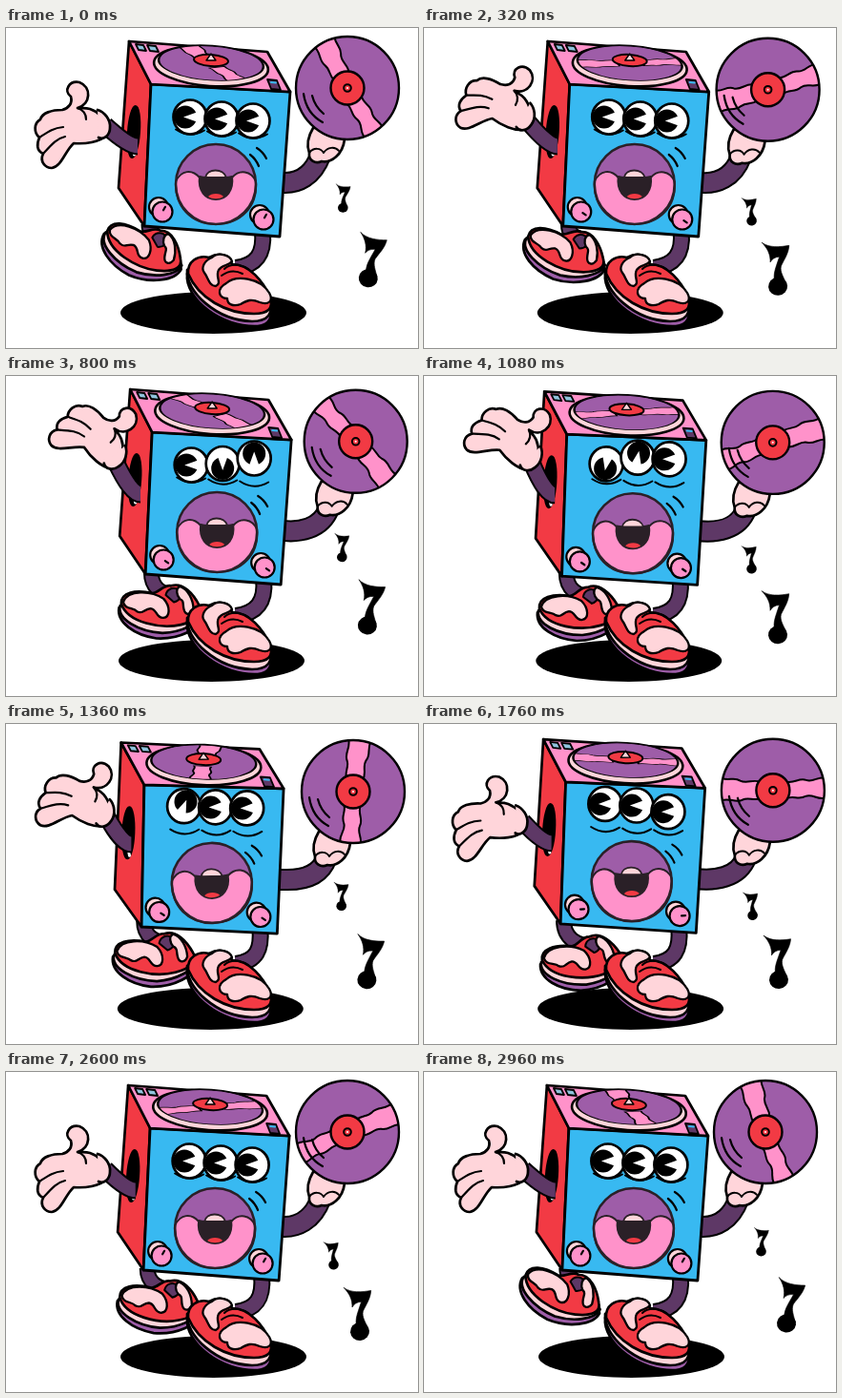
These frames come from a looping animation (432x336 px, 3 s). An HTML page with a canvas:

```html
<!DOCTYPE html>
<html lang="en">
<head>
<meta charset="utf-8">
<title>Dancing speaker</title>
<style>
html, body { margin: 0; width: 100%; height: 100%; overflow: hidden; background: #fff; }
canvas { display: block; width: 432px; height: 336px; }
</style>
</head>
<body>
<canvas id="stage" width="432" height="336"></canvas>
<script>
const ctx = document.getElementById('stage').getContext('2d');
const LOOP = 3000, SPIN = 1500, WIGGLE = 750, STEP = 40;
const RAD = Math.PI / 180, TAU = Math.PI * 2;
const INK = '#000', DARK = '#2a2027', BLUE = '#38b9f1', RED = '#f23a44', PINK = '#ff92ca',
      PURPLE = '#9e5da8', PLUM = '#5e3866', SKIN = '#ffd5da', WHITE = '#fff', STEEL = '#8fc3dc';

// Smooth step from 0 to 1 between two times
function ease(t, from, to) {
  const u = Math.min(1, Math.max(0, (t - from) / (to - from)));
  return u * u * (3 - 2 * u);
}
const pulse = (t, a, b, c, d) => ease(t, a, b) - ease(t, c, d);
const wave = (t, shift) => Math.cos(TAU * (t - shift) / WIGGLE);

function pose(t) {
  const lean = pulse(t, 900, 1300, 1420, 2000);
  const sway = 1.2 * Math.sin(TAU * t / LOOP);
  const greet = pulse(t, 0, 550, 950, 1900);
  const step = pulse(t, 0, 1300, 2300, 3000);
  const push = pulse(t, 0, 900, 2120, 2600);
  return {
    spin: -29 - 360 * t / SPIN,
    dial: -60 + 95 * pulse(t, 0, 320, 1500, 2100),
    shade: 217.5 - 2 * greet - 2 * lean,
    body: { x: sway - 3 * lean, y: lean, a: -1.6 * lean },
    wrist: { x: 106 + 11 * greet ** 2 - 2 * lean, y: 104 - 12 * greet ** 2, a: 52 * greet },
    foot: { x: 143 + 29 * step - 16 * lean, y: 234 + 19 * step - 6 * lean, a: 23 - 29 * step + 8 * lean },
    disc: { x: 358 + 9 * push - 3 * lean, y: 63 + 6 * push + 2 * lean },
    big: { x: 375.5 - 4.5 * wave(t, 340), y: 268 - 6 * wave(t, 62), a: 1 - 5.5 * wave(t, 340) },
    tiny: { x: 348.5 - 5 * wave(t, 340), y: 195.5 + 7 * wave(t, 340), a: -4 - 4 * wave(t, 340) }
  };
}

function place(x, y, angle, draw, sx = 1, sy = sx) {
  ctx.save();
  ctx.translate(x, y);
  ctx.rotate(angle * RAD);
  ctx.scale(sx, sy);
  draw();
  ctx.restore();
}
function ink(path, fill, width = 2.7, line = INK) {
  if (fill) { ctx.fillStyle = fill; ctx.fill(path); }
  if (width) { ctx.strokeStyle = line; ctx.lineWidth = width; ctx.stroke(path); }
}
const shape = (d, fill, width, line) => ink(new Path2D(d), fill, width, line);
function oval(x, y, rx, ry, fill, width, angle = 0, line = INK) {
  const p = new Path2D();
  p.ellipse(x, y, rx, ry, angle * RAD, 0, TAU);
  ink(p, fill, width, line);
}
function limb(d, width) {
  ctx.lineCap = 'butt';
  shape(d, null, width + 4);
  shape(d, null, width, PLUM);
  ctx.lineCap = 'round';
}

function vinyl(spin) {
  oval(0, 0, 54, 54, PURPLE, 0);
  place(0, 0, spin, () => {
    ctx.beginPath();
    ctx.arc(0, 0, 53.5, 0, TAU);
    ctx.clip();
    shape('M-10-56C-5-47-13-40-9-32C-6-25-11-21-8-13L9-13C13-20 7-27 11-34C16-41 10-46 15-56Z', PINK, 2);
    shape('M-9 13C-5 21-11 26-7 34C-4 42-12 46-9 56L12 56C14 47 7 43 10 35C13 27 6 23 9 13Z', PINK, 2);
  });
  oval(0, 0, 54, 54, null, 2.4);
}

function record(spin) {
  shape('M-36 42C-42 52-43 60-40 68C-41 76-34 80-27 77C-17 79-5 70-3 54L-12 40Z', SKIN);
  shape('M-40 68C-35 62-28 63-25 68C-21 62-13 61-9 66', null, 2);
  vinyl(spin);
  shape('M-46 6C-44 20-37 30-26 36M-37 8C-35 16-31 22-25 27', null, 2.2);
  oval(0, 0, 17.5, 17.5, RED, 2.4);
  oval(0, 0, 3.8, 3.8, RED, 2);
  oval(0, 0, 1, 1, WHITE, 0);
}

function note({ x, y, a }, size) {
  place(x, y, a, () => {
    oval(0, 0, 10, 9.5, INK, 0);
    shape('M-13-47C-6-41 5-41 15-42C14-34 9-28 5-21C3-15 7-9 9-2L-3-6C-4-13-1-19 1-24L4-31C-1-31-4-29-6-26C-5-34-8-41-13-47Z', INK, .6);
  }, size);
}

function hand() {
  shape('M1 2C-2-9-9-16-18-19C-25-21-30-19-31-20C-17-24-16-42-29-47C-40-49-46-38-38-32C-36-25-40-20-47-18C-58-18-68-15-70-8C-77-4-77 6-71 11C-74 18-74 25-67 28C-71 36-65 43-58 43C-48 42-44 25-35 17C-23 18-8 16-1 9Z', SKIN);
  shape('M-71 11C-62 5-57 1-46 0M-67 28C-58 18-53 12-44 10M-31-20C-25-18-22-14-22-8', null, 2.2);
  shape('M-10-18C-3-16 4-8 3 1C3 8-3 14-9 11', SKIN);
}

function foot() {
  shape('M-44-1C-46 15-26 27-3 29C20 29 44 16 45 2L40-6Z', PURPLE);
  shape('M-43-3C-46 11-22 23 3 23C23 21 43 10 44-2L37-8Z', SKIN);
  shape('M-42-5C-43-17-28-21-10-18C-3-19 1-28 9-27C21-32 33-20 40-8C46 0 39 8 22 13C2 19-34 15-42-5Z', RED);
  shape('M-40-7C-36-20-12-21 2-13C10-5 10 6 3 7C-5 8-4-2-11-2C-18-1-18 5-25 2C-29-2-38 1-40-7Z', SKIN, 2.3);
  shape('M4-17C5-24 12-27 18-23C22-18 19-12 13-10Z', PLUM, 2);
  shape('M18-27C27-25 33-14 34-4C32 3 26 3 24-3C22-9 24-12 19-14C15-18 14-24 18-27Z', SKIN, 2.3);
}

function standingFoot() {
  shape('M190 258C187 284 226 315 264 313C277 312 280 302 277 291Z', PURPLE);
  shape('M190 254C188 276 220 307 258 308C275 308 281 299 276 287Z', SKIN);
  shape('M191 258C190 245 201 238 213 241C224 235 235 238 237 248C255 248 270 266 277 283C281 295 274 300 260 300C231 300 202 284 191 258Z', RED);
  shape('M231 268C241 259 266 262 276 278C281 287 275 291 266 288C257 284 253 286 246 290C238 293 232 290 232 284C223 284 220 274 231 268Z', SKIN, 2.3);
  shape('M216 241C222 235 235 238 237 245C233 250 227 248 223 254C219 261 227 268 220 271C213 271 212 262 208 257C204 252 208 244 216 241Z', SKIN, 2.3);
  shape('M229 253C235 247 247 248 254 253M226 260C234 254 242 255 248 258', null, 2);
}

// A pie-cut pupil that looks left and rolls once around
function eye(x, y, look) {
  oval(x, y, 17.5, 18, WHITE);
  const cx = Math.cos(look), cy = Math.sin(look);
  const px = x + 5 * cx, py = y + 5 * cy;
  oval(px, py, 12, 12, INK, 0);
  const cut = new Path2D();
  cut.moveTo(px + 2 * cx, py + 2 * cy);
  cut.arc(px, py, 13, look + Math.PI - .4, look + Math.PI + .4);
  cut.closePath();
  ink(cut, WHITE, 0);
}

function eyes(t) {
  for (let i = 0; i < 3; i++) {
    const x = 193 + 33 * i, y = 93.5 + 2 * i, local = t - 950 + 300 * i;
    shape(`M${x - 15} ${y + 13}Q${x} ${y + 23} ${x + 15} ${y + 14}`, null, 2);
    const roll = Math.min(1, Math.max(0, local / 600));
    eye(x, y - 11 * pulse(local, 0, 400, 1200, 1650), Math.PI - TAU * roll);
  }
}

function knob(x, y, dial) {
  oval(x - 3, y - 4, 10, 10, SKIN, 2.2);
  oval(x + 1, y + 1, 10.5, 10.5, PINK, 2.2);
  place(x + 1, y + 1, dial, () => shape('M2 0L6 0', null, 2.2));
}

function deck(spin) {
  shape('M129 14L274 25L298 67L152 59Z', PINK);
  oval(215, 40, 60, 21, SKIN, 2.6, 4);
  place(215, 37, 4, () => vinyl(spin), 55 / 54, 18 / 54);
  oval(215, 34, 18, 6, RED, 2, 4);
  shape('M210 34L215 27L220 34Z', SKIN, 1.4);
  shape('M136 17L144 18L147 24L139 23Z', STEEL, 1.8);
  shape('M148 18L157 19L160 25L151 24Z', STEEL, 1.8);
  shape('M274 54L284 55L288 65L278 64Z', PLUM, 1.8);
  shape('M278 57L283 57.5', null, 2, BLUE);
}

function speaker() {
  oval(220, 164, 42, 42, PURPLE, 0);
  shape('M178 161C184 149 195 148 203 157C213 160 229 160 237 157C245 148 257 150 262 161C264 188 246 206 220 206C194 206 177 188 178 161Z', PINK, 2, DARK);
  oval(220, 164, 42, 42, null, 2.6, 0, DARK);
  shape('M203 156C212 158 228 158 237 156C239 171 231 180 220 180C209 180 201 171 203 156Z', DARK, 2, DARK);
  shape('M209 157C211 147 228 147 231 157Z', SKIN, 1.8, DARK);
  shape('M212 177C215 173 225 173 228 177C224 180 216 180 212 177Z', RED, 0);
  shape('M256 133C260 136 263 140 265 145M263 126C268 129 271 133 273 137', null, 2.2);
}

function cabinet(t, p) {
  shape('M129 14L152 59L145 208L118 168Z', RED);
  shape('M152 59L298 67L287 219L145 208Z', BLUE, 2.8);
  deck(p.spin);
  oval(134, 109, 6, 27, INK, 2, 4);
  shape('M134 130L134.5 133', null, 3, WHITE);
  speaker();
  eyes(t);
  knob(163, 192, p.dial);
  knob(269, 200, p.dial);
}

function draw(t) {
  const p = pose(t), { body, wrist, foot: shoe, disc } = p;
  ctx.fillStyle = WHITE;
  ctx.fillRect(0, 0, 432, 336);
  ctx.lineJoin = ctx.lineCap = 'round';
  oval(p.shade, 299, 97.5, 22, INK, 0);

  // Legs
  const hip = { x: 150 + 2 * body.x, y: 206 + body.y };
  const ankle = { x: shoe.x + 16, y: shoe.y - 16 };
  limb(`M${hip.x} ${hip.y}Q${hip.x} ${ankle.y - 2} ${ankle.x} ${ankle.y}`, 13);
  place(shoe.x, shoe.y, shoe.a, foot);
  limb(`M${269 + body.x} 214C${271 + body.x} 237 263 249 241 252`, 14);
  standingFoot();

  // Arm with the record
  limb(`M${286 + body.x} ${162 + body.y}C${306 + body.x} 165 ${disc.x - 36} ${disc.y + 92} ${disc.x - 28} ${disc.y + 70}`, 19);
  place(disc.x, disc.y, 0, () => record(p.spin));

  place(288 + body.x, 219 + body.y, body.a, () => {
    ctx.translate(-288, -219);
    cabinet(t, p);
  });

  // Waving arm
  const armX = 138 + 2.5 * body.x, armY = 124 + 2 * body.y;
  limb(`M${armX} ${armY}Q${armX - 10} ${armY} ${wrist.x - 2} ${wrist.y - 2}`, 15);
  place(wrist.x, wrist.y, wrist.a, hand);

  note(p.big, 1);
  note(p.tiny, .53);
}

const start = performance.now();
function tick() {
  const t = (performance.now() - start) % LOOP;
  draw(Math.floor(t / STEP) * STEP);
  requestAnimationFrame(tick);
}
tick();
</script>
</body>
</html>
```
